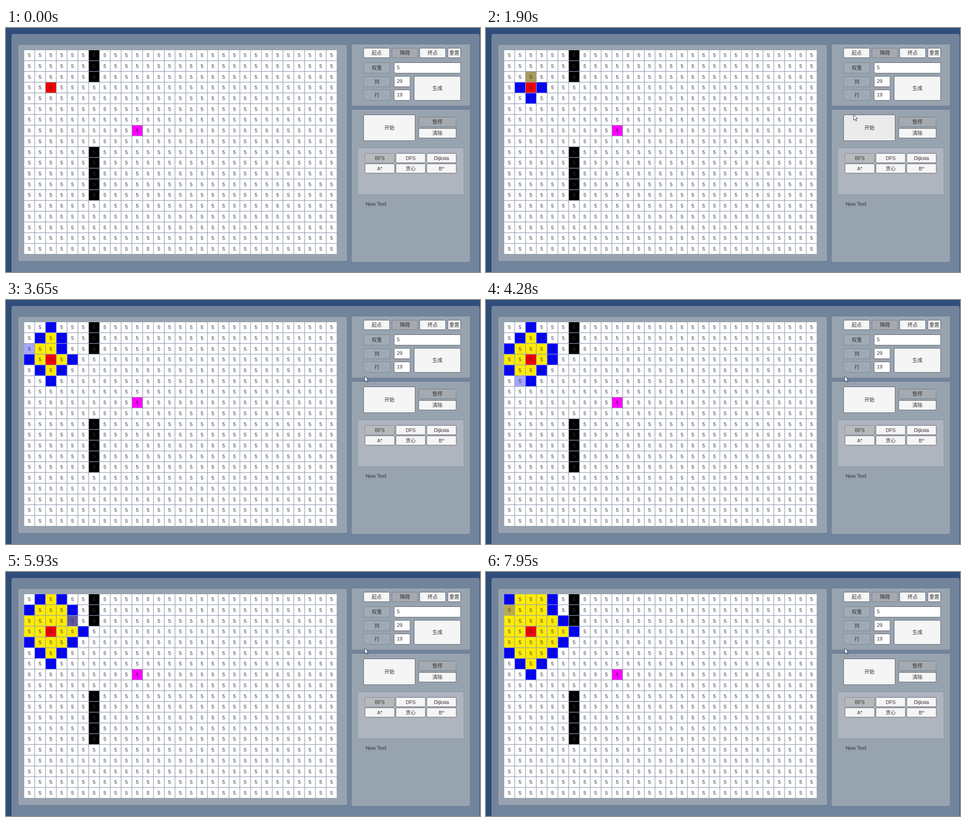
These frames come from a looping animation (1041x538 px, 8000 ms). An HTML page:

```html
<!DOCTYPE html>
<html lang="zh">
<head>
<meta charset="utf-8">
<title>BFS</title>
<style>
  html, body { margin: 0; width: 100%; height: 100%; overflow: hidden; background: #304d79; }
  svg { display: block; width: 1041px; height: 538px; }
  text { font: 11px "Liberation Sans", "Noto Sans CJK SC", "Noto Sans CJK", sans-serif; fill: #323232; }
  .mid { text-anchor: middle; }
</style>
</head>
<body>
<svg id="stage" viewBox="0 0 1041 538"></svg>
<script>
const LOOP = 8000, COLS = 29, ROWS = 19, PITCH = 23.71, CELL = 22.4;
const CLICK = 1270, FRAME = 69.58, SEARCH_START = 1410, OP_TIME = 104.25;
const WHITE = [255, 255, 255], BLUE = [0, 0, 255], YELLOW = [255, 235, 4];
const START = [2, 3], GOAL = [10, 7];
const stage = document.getElementById('stage');

function add(tag, attrs, text) {
  const el = document.createElementNS('http://www.w3.org/2000/svg', tag);
  for (const key in attrs) el.setAttribute(key, attrs[key]);
  if (text) el.textContent = text;
  return stage.appendChild(el);
}
const box = (x, y, width, height, fill, rx = 0, stroke = 'none') =>
  add('rect', { x, y, width, height, fill, rx, stroke });
const label = (x, y, text, cls = 'mid') => add('text', { x, y: y + 4, class: cls }, text);

function button(x, y, w, h, text, fill = '#f5f5f5', stroke = '#59616b') {
  const rect = box(x + .5, y + .5, w - 1, h - 1, fill, 2.5, stroke);
  label(x + w / 2, y + h / 2, text);
  return rect;
}
function input(x, y, w, h, text) {
  box(x + .5, y + .5, w - 1, h - 1, '#fff', 2.5, '#59616b');
  label(x + 6.5, y + 11, text, '');
}

// Panels
const EDGE = '#66778f';
box(12.5, 13.5, 1027, 540, '#72849b', 3, '#6a7c95');
box(26.5, 36.5, 723, 478, '#98a3b0', 3, EDGE);
box(758.5, 35.5, 261, 136.5, '#98a3b0', 3, EDGE);
box(758.5, 179.5, 261, 337, '#98a3b0', 3, EDGE);
box(772.5, 264.5, 233, 103, '#aeb5bf', 3, '#8b96a5');

// Controls
const DISABLED = '#a5a9b0', TAG = '#a0aab6', TAG_EDGE = '#7b8795';
button(785, 44, 58, 22, '起点');
button(847, 44, 58, 22, '障碍', DISABLED, '#777f8a');
button(908, 44, 58, 22, '终点');
button(970, 44, 29, 22, '重置');
button(785, 76, 59, 24, '权重', TAG, TAG_EDGE);
button(785, 107, 59, 23, '列', TAG, TAG_EDGE);
button(785, 136, 59, 24, '行', TAG, TAG_EDGE);
input(852, 76, 147, 24, '5');
input(852, 106, 36, 24, '29');
input(852, 136, 36, 24, '19');
button(896, 106, 103, 54, '生成');
const startButton = button(785, 191, 114, 58, '开始');
button(906, 196, 83, 22, '暂停', DISABLED, '#777f8a');
button(906, 221, 83, 22, '清除');
['BFS', 'DFS', 'Dijksta', 'A*', '贪心', 'B*'].forEach((name, i) =>
  button(788 + i % 3 * 67.7, 276 + (i > 2 ? 23 : 0), 66, 21.5, name, i ? '#f5f5f5' : '#b8babd', i ? '#59616b' : '#858b93'));
label(790, 388, 'New Text', '');

// Grid
const isWall = (c, r) => c === 6 && (r < 3 || (r > 8 && r < 14));
const same = (c, r, [x, y]) => c === x && r === y;
function baseColor(c, r) {
  if (isWall(c, r)) return '#000';
  if (same(c, r, START)) return '#f00000';
  return same(c, r, GOAL) ? '#ff00ff' : '#fff';
}
box(40, 49, 686.3, 449.2, '#929eb0');
const cells = [];
for (let r = 0; r < ROWS; r++) {
  for (let c = 0; c < COLS; c++) {
    const x = 40 + c * PITCH, y = 49 + r * PITCH;
    cells.push(box(x, y, CELL, CELL, baseColor(c, r)));
    label(x + CELL / 2, y + CELL / 2, '5');
  }
}

// Breadth-first search as a list of colour fades, one after another
function search(limit) {
  const ops = [], queue = [START], seen = new Set([START.join()]);
  while (ops.length < limit) {
    const [c, r] = queue.shift();
    if (!same(c, r, START)) ops.push({ cell: cells[r * COLS + c], from: BLUE, to: YELLOW });
    for (const [dc, dr] of [[0, -1], [-1, 0], [0, 1], [1, 0]]) {
      const x = c + dc, y = r + dr, key = [x, y].join();
      if (x < 0 || y < 0 || x >= COLS || y >= ROWS || isWall(x, y) || seen.has(key)) continue;
      seen.add(key);
      queue.push([x, y]);
      ops.push({ cell: cells[y * COLS + x], from: WHITE, to: BLUE });
    }
  }
  return ops;
}
const ops = search(64);

const cursor = add('path', {
  d: 'M0 0V12.2L2.8 9.6 4.8 14.2 6.9 13.3 4.9 8.9H8.6Z',
  fill: '#fff', stroke: '#27304a', 'stroke-width': 1
});

// Rows of [time, ...values]
const CURSOR_PATH = [[110, 1007, 518], [490, 900, 342], [870, 828, 231], [1550, 828, 231],
  [1890, 808, 192], [1966, 800, 181], [2035, 794, 174], [2100, 787.5, 168]];
const BUTTON_TONE = [[1260, 245], [1350, 192], [1400, 192], [1500, 235], [1930, 235], [2030, 245]];

const mix = (a, b, u) => a.map((v, i) => v + (b[i] - v) * u);
const rgb = color => `rgb(${color.map(Math.round)})`;
function track(rows, t) {
  const next = rows.findIndex(row => row[0] > t);
  if (next < 0) return rows[rows.length - 1].slice(1);
  if (next === 0) return rows[0].slice(1);
  const a = rows[next - 1], b = rows[next];
  return mix(a, b, (t - a[0]) / (b[0] - a[0])).slice(1);
}
const snap = (t, base) => base + Math.floor((t - base) / FRAME + .2) * FRAME;

function draw(time) {
  const t = snap(time, time < CLICK ? 110 : CLICK);
  const progress = (t - SEARCH_START) / OP_TIME;
  for (const op of ops) op.cell.setAttribute('fill', '#fff');
  ops.forEach((op, i) => {
    if (progress > i) op.cell.setAttribute('fill', rgb(mix(op.from, op.to, Math.min(1, progress - i))));
  });
  const [tone] = track(BUTTON_TONE, t);
  startButton.setAttribute('fill', rgb([tone, tone, tone]));
  cursor.setAttribute('visibility', t < 110 ? 'hidden' : 'visible');
  cursor.setAttribute('transform', `translate(${track(CURSOR_PATH, t)})`);
}

const began = performance.now();
function tick() {
  draw((performance.now() - began) % LOOP);
  requestAnimationFrame(tick);
}
tick();
</script>
</body>
</html>
```
